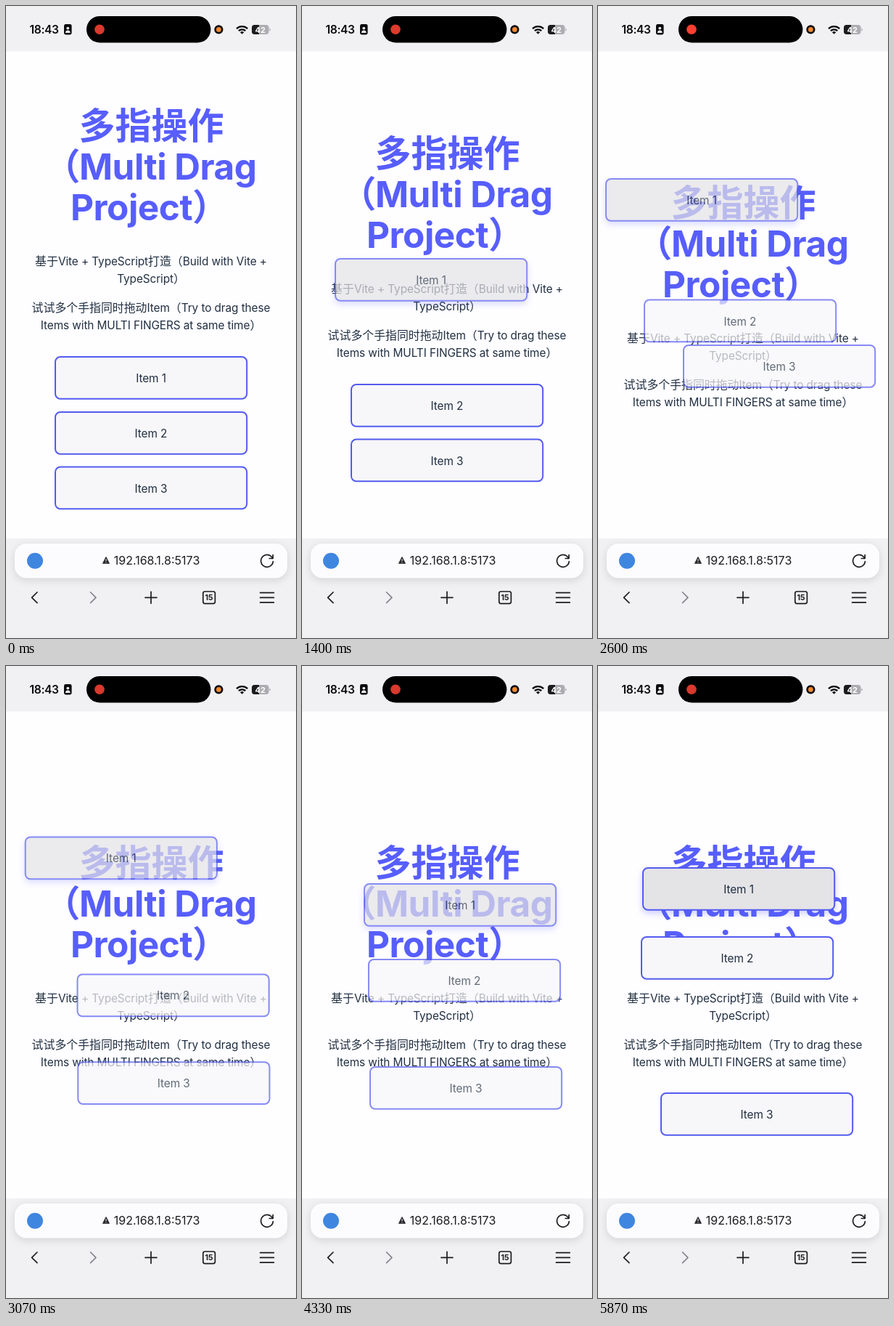
Write an HTML page that moves like this. It is 400 px wide and 870 px high and loops after 5.94 s.

```html
<!DOCTYPE html>
<html lang="zh-CN">
<head>
<meta charset="utf-8">
<title>Multi Drag</title>
<style>
  html, body { margin: 0; width: 100%; height: 100%; overflow: hidden; background: #fefdff; }
  svg { display: block; width: 400px; height: 870px; }
  text { font-family: Inter, "Noto Sans CJK SC", "Noto Sans CJK", sans-serif; }
  .title { font-size: 49.5px; font-weight: 700; fill: #575efc; letter-spacing: -.01em; }
  .title .han { font-size: 50px; letter-spacing: 0; }
  .mid { text-anchor: middle; }
  .body { font-size: 15.4px; fill: #213042; letter-spacing: -.1px; }
  .body .han { font-size: 15.9px; letter-spacing: 0; }
  .item rect { fill: #f7f6f8; stroke: #545bf0; stroke-width: 2; }
  .item.hover rect { fill: #e4e3e6; filter: drop-shadow(0 4px 4px rgba(83, 91, 250, .28)); }
  .pill { fill: #fcfbfd; filter: drop-shadow(0 3px 6px rgba(0, 0, 0, .12)); }
  .line { fill: none; stroke: #1d1d20; stroke-width: 1.7; stroke-linecap: round; stroke-linejoin: round; }
</style>
</head>
<body>
<svg viewBox="0 0 400 870">
  <rect width="400" height="870" fill="#fefdff"/>

  <g id="copy">
    <g class="title">
      <text class="han mid" x="200.5" y="182.5">多指操作</text>
      <text class="han" x="52.5" y="238.5">（</text>
      <text x="101" y="238.5">Multi Drag</text>
      <text x="89" y="294.5">Project</text>
      <text class="han" x="257" y="294.5">）</text>
    </g>
    <g class="body mid">
      <text x="200" y="357"><tspan class="han">基于</tspan>Vite + TypeScript<tspan class="han">打造（</tspan>Build with Vite +</text>
      <text x="200" y="381">TypeScript<tspan class="han">）</tspan></text>
      <text x="200" y="421"><tspan class="han">试试多个手指同时拖动</tspan>Item<tspan class="han">（</tspan>Try to drag these</text>
      <text x="200" y="445">Items with MULTI FINGERS at same time<tspan class="han">）</tspan></text>
    </g>
  </g>
  <g id="items"></g>

  <!-- status bar -->
  <rect width="400" height="62.5" fill="#f1f0f3"/>
  <text x="32.5" y="38" font-size="15.7" font-weight="600" letter-spacing="-.4" fill="#0b0b0d">18:43</text>
  <rect x="80" y="25" width="10.6" height="14.5" rx="2.4" fill="#0b0b0d"/>
  <circle cx="85.3" cy="30.6" r="1.9" fill="#f1f0f3"/>
  <path d="M82 37q0-3.4 3.3-3.4t3.3 3.4z" fill="#f1f0f3"/>
  <rect x="111" y="13.9" width="171.4" height="36.6" rx="18.3"/>
  <circle id="rec" cx="129" cy="32.2" r="6.8"/>
  <circle cx="293.4" cy="32.4" r="6.1" fill="#0b0b0d"/>
  <circle cx="293.4" cy="32.4" r="3.4" fill="#f08a2c"/>
  <g fill="none" stroke="#0b0b0d" stroke-width="2.3">
    <path d="M318 31.2a11 11 0 0 1 15.2 0"/>
    <path d="M320.9 34.2a6.8 6.8 0 0 1 9.4 0"/>
  </g>
  <path d="M323 36.2a3.8 3.8 0 0 1 5.2 0l-2.6 2.6z" fill="#0b0b0d"/>
  <clipPath id="cell"><rect x="339" y="26" width="23.5" height="13" rx="4"/></clipPath>
  <g clip-path="url(#cell)">
    <rect x="339" y="26" width="24" height="13" fill="#adacb0"/>
    <rect x="339" y="26" width="10" height="13" fill="#1c1c1f"/>
  </g>
  <path d="M363.4 30.4q1.5.5 1.5 2.1t-1.5 2.1z" fill="#adacb0"/>
  <text class="mid" x="350.8" y="36.6" font-size="11" font-weight="700" fill="#fff">42</text>

  <!-- browser bar -->
  <rect y="733" width="400" height="137" fill="#f1f0f3"/>
  <rect class="pill" x="12" y="740" width="376" height="47.5" rx="16"/>
  <circle cx="40" cy="763.8" r="11" fill="#3f86e0"/>
  <path d="M138 758.8l4.3 8.4h-8.6z" fill="#2c2c30" stroke="#2c2c30" stroke-width="1.2" stroke-linejoin="round"/>
  <path d="M138 761.2v3M138 765.4v1" stroke="#fcfbfd" stroke-width="1"/>
  <text class="mid" x="208" y="768.5" font-size="16" fill="#1d1d20">192.168.1.8:5173</text>
  <g class="line">
    <path d="M367.6 760.2a8.4 8.4 0 1 0 .8 4.4M368.2 755.6v4.9h-4.9"/>
    <path d="M43 807l-7.4 7.3 7.4 7.3"/>
    <path d="M116.6 807l7.4 7.3-7.4 7.3" stroke="#85858a"/>
    <path d="M192 814.3h16M200 806.3v16"/>
    <rect x="271.8" y="806" width="16.6" height="16.6" rx="2.6"/>
    <path d="M350.6 807.6h18.8M350.6 814.4h18.8M350.6 821.2h18.8"/>
  </g>
  <text class="mid" x="280.1" y="818.2" font-size="10.5" font-weight="700" fill="#1d1d20">15</text>
</svg>

<script>
const LOOP = 5940, STEP = 200 / 3, LAST = 88;
const HOME_X = 67, RELEASE = 5130, FADE = 130;

// Drag paths: [ms, x, y]; the first point is the grab.
const paths = [
  [[530, HOME_X, 482], [800, 60, 452], [1100, 50, 388], [1400, 45, 347], [1800, 15, 315],
   [2200, 12, 269], [2600, 10, 237], [2900, 18, 233], [3600, 57, 251], [4333, 85, 299],
   [4800, 67, 284], [RELEASE, 61, 277]],
  [[1530, HOME_X, 520], [1800, 56, 468], [2200, 56, 426], [2600, 63, 403.5], [3100, 100, 425],
   [3600, 134, 448], [3900, 135, 440], [4333, 91, 403], [4750, 47, 381], [RELEASE, 59, 372]],
  [[2130, HOME_X, 558], [2400, 95, 501], [2600, 117, 466], [2900, 106, 520], [3600, 78, 597],
   [4000, 81, 580], [4333, 93, 551], [4700, 92, 606], [RELEASE, 86, 587]]
];
const shifts = [0, 38, 76, 106];   // page text drop for each item lifted out
const flowY = [482, 558, 633.5];

const $ = id => document.getElementById(id);
const clamp = v => Math.max(0, Math.min(1, v));

$("items").innerHTML = paths.map((_, i) =>
  `<g class="item"><rect x="1" y="1" width="264.2" height="57.8" rx="7"/>
   <text class="body mid" x="133" y="36">Item ${i + 1}</text></g>`).join("");
const items = [...$("items").children];

// Monotone cubic through the points, flat at turning points.
function along(p, t, k) {
  const end = p.length - 1;
  if (t >= p[end][0]) return p[end][k];
  const i = p.findIndex(q => q[0] > t) - 1;
  const rate = j => (p[j + 1][k] - p[j][k]) / (p[j + 1][0] - p[j][0]);
  const slope = j => {
    if (j === 0 || j === end) return 0;
    const a = rate(j - 1), b = rate(j);
    return a * b <= 0 ? 0 : 2 * a * b / (a + b);
  };
  const h = p[i + 1][0] - p[i][0], u = (t - p[i][0]) / h, v = 1 - u;
  return p[i][k] * v * v * (1 + 2 * u) + p[i + 1][k] * u * u * (3 - 2 * u)
    + h * u * v * (slope(i) * v - slope(i + 1) * u);
}

function draw(t) {
  const lifted = paths.filter(p => t >= p[0][0]).length;
  $("copy").setAttribute("transform", `translate(0 ${shifts[lifted]})`);

  items.forEach((el, i) => {
    const p = paths[i], start = p[0][0], held = t >= start;
    const x = held ? along(p, t, 1) : HOME_X;
    const y = held ? along(p, t, 2) : flowY[i] - 38 * lifted;
    const fade = clamp((t - start) / FADE) - clamp((t - RELEASE) / FADE);
    el.setAttribute("transform", `translate(${x} ${y})`);
    el.setAttribute("opacity", 1 - .3 * fade);
  });
  items[0].classList.toggle("hover", lifted > 0);

  const glow = Math.max(0, Math.cos((t / 1000 - .6) * 2 * Math.PI)) ** 2;
  $("rec").setAttribute("fill", `rgb(${218 + 37 * glow} ${57 + 6 * glow} ${45 + 5 * glow})`);
}

const began = performance.now();
function tick() {
  const t = (performance.now() - began) % LOOP;
  draw(Math.min(LAST, Math.floor((t + 4) / STEP)) * STEP);
  requestAnimationFrame(tick);
}
tick();
</script>
</body>
</html>
```
